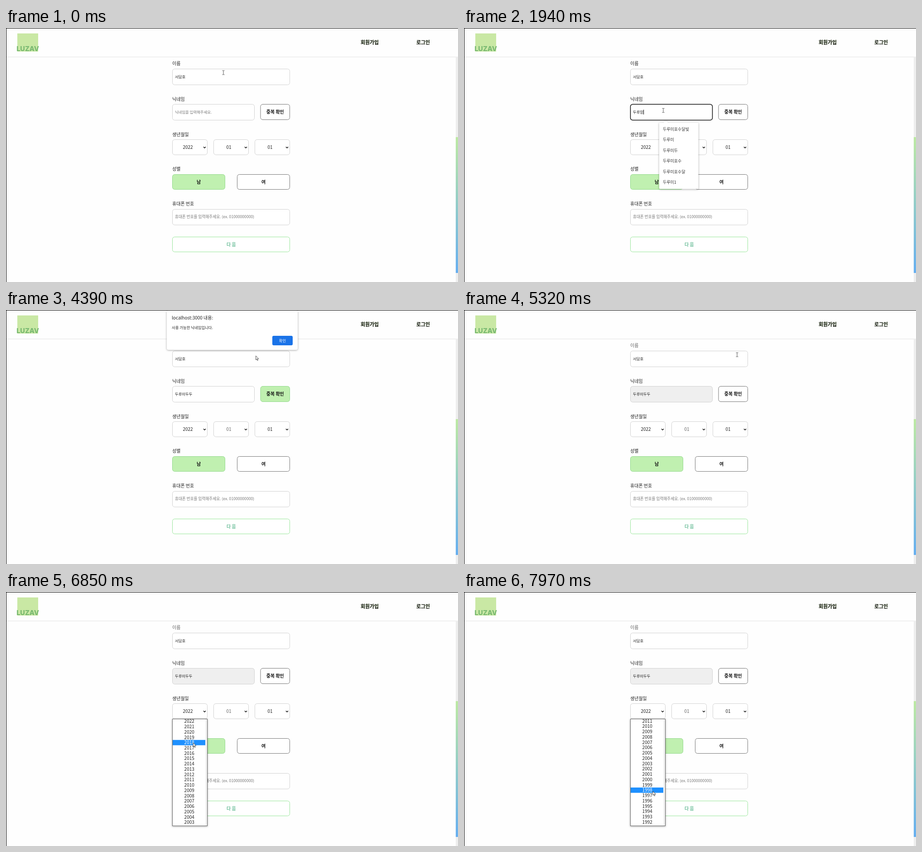
An HTML page for the animation above (8 s loop, 998x561 px).

```html
<!DOCTYPE html>
<html>
<head>
<meta charset="utf-8">
<title>Sign-up form</title>
<style>
  html, body { margin: 0; width: 100%; height: 100%; overflow: hidden; background: #fefefe; }
  svg { display: block; width: 998px; height: 561px; }
  text { font: 10px "Noto Sans CJK KR", "Noto Sans CJK", sans-serif; fill: #222; white-space: pre; }
  .bold { font-weight: 700; fill: #111; }
  .mid { text-anchor: middle; }
  .nav { font-size: 10.9px; filter: drop-shadow(.9px .8px 0 #a9dd74); }
  .small { font-size: 8.4px; }
  .hint { fill: #777; }
  .brand { font: 800 14.5px Inter, sans-serif; fill: #79b971; }
  .box { fill: #fff; stroke: #d2d2d2; }
  .dark { stroke: #777; }
  .pick { fill: #c0f0b0; stroke: #93d98d; }
  .next { stroke: #98e69a; }
  .chevron { fill: none; stroke: #111; stroke-width: 1.5; }
  .panel { fill: #fff; filter: drop-shadow(0 1px 2px #0005); }
  .popup text { font-size: 9px; fill: #333; }

  .step { animation: 8s step-end infinite; }
  #field { animation-name: field; }
  #check { animation-name: check; }
  #nameLabel { animation-name: name-tone; }
  #month { animation-name: month-tone; }
  .popup { animation-name: popup; }
  .dialog { animation-name: dialog; }
  .list { animation-name: list; }
  #caret { animation-name: caret; }
  .beam { animation-name: beam; }
  .arrow { animation-name: arrow; }
  .ping { animation-name: ping; }
  .cursor { animation: move 8s linear infinite; }

  @keyframes field {
    0%, 42.6% { fill: #fff; stroke: #d2d2d2; stroke-width: 1; }
    8.62% { stroke: #111; stroke-width: 1.5; }
    64.1%, 100% { fill: #efefef; stroke: #d2d2d2; stroke-width: 1; }
  }
  @keyframes check {
    0%, 64.1%, 73.7%, 100% { fill: #fff; stroke: #777; }
    41.8%, 71.75% { fill: #c0f0b0; stroke: #93d98d; }
  }
  @keyframes name-tone { 0% { fill: #222; } 64.1%, 100% { fill: #666; } }
  @keyframes month-tone { 0% { fill: #222; } 27.5%, 100% { fill: #666; } }
  @keyframes popup { 0%, 27.5%, 100% { visibility: hidden; } 8.62% { visibility: visible; } }
  @keyframes dialog { 0%, 64.1%, 100% { visibility: hidden; } 45% { visibility: visible; } }
  @keyframes list { 0% { visibility: hidden; } 81.25%, 100% { visibility: visible; } }
  @keyframes caret {
    0%, 32.9%, 42.6%, 100% { visibility: hidden; }
    8.62%, 39.1% { visibility: visible; }
  }
  @keyframes beam { 0%, 66% { visibility: visible; } 35.5%, 68.7%, 100% { visibility: hidden; } }
  @keyframes arrow { 0%, 66% { visibility: hidden; } 35.5%, 68.7%, 100% { visibility: visible; } }
  @keyframes ping {
    0%, 9.25%, 44.3%, 64.4%, 81.5%, 100% { visibility: hidden; }
    8.62%, 42.6%, 63.5%, 80.6% { visibility: visible; }
  }
  @keyframes move {
    0%, .5% { transform: translate(480px, 98.5px); animation-timing-function: ease-in-out; }
    5%, 32.1% { transform: translate(440px, 182px); animation-timing-function: ease-in-out; }
    37.5%, 39.5% { transform: translate(554px, 209px); animation-timing-function: ease-out; }
    42.5%, 45.5% { transform: translate(572px, 186px); }
    50% { transform: translate(576px, 152px); }
    55% { transform: translate(551px, 100px); }
    60.75% { transform: translate(580px, 48px); }
    63.5%, 64.3% { transform: translate(606px, 68px); }
    66.5% { transform: translate(603px, 98.5px); }
    71.4% { transform: translate(600px, 162px); }
    77.25% { transform: translate(513.5px, 264px); animation-timing-function: ease-out; }
    80.25%, 82.25% { transform: translate(418px, 268px); }
    90.5%, 96.3% { transform: translate(406.5px, 426px); animation-timing-function: ease-out; }
    99.6%, 100% { transform: translate(417px, 440px); }
  }
</style>
</head>
<body>
<svg viewBox="0 0 998 561">
  <defs>
    <linearGradient id="thumb" x2="0" y2="1">
      <stop stop-color="#bde9a3"/><stop offset="1" stop-color="#67aff0"/>
    </linearGradient>
    <clipPath id="listClip"><path d="M368 280.5h76v235.5h-76z"/></clipPath>
  </defs>

  <path d="M0 64h998" stroke="#e2e2e2"/>
  <path d="M993 65h5v496h-5z" fill="#eee"/>
  <path d="M993 241h5v300h-5z" fill="url(#thumb)"/>
  <path d="M0 .5h998M.5 0v561" stroke="#000"/>
  <rect x="25" y="12" width="46" height="40" fill="#c9e8a4"/>
  <text class="brand mid" x="48" y="51">LUZAV</text>
  <text class="bold nav mid" x="803" y="36.3">회원가입</text>
  <text class="bold nav mid" x="921" y="36.3">로그인</text>

  <text id="nameLabel" class="step" x="367" y="82.3">이름</text>
  <rect class="box" x="367.5" y="90.5" width="259" height="35" rx="5"/>
  <text class="small" x="373" y="110.5">서담호</text>

  <text x="367" y="160.6">닉네임</text>
  <rect id="field" class="box step" x="367.5" y="168.5" width="181" height="35" rx="5"/>
  <text id="typed" class="small" x="373" y="188.8"></text>
  <rect id="caret" class="step" x="373" y="180.5" width="1" height="10.5"/>
  <rect id="check" class="box dark step" x="562" y="168.5" width="64.5" height="34" rx="5"/>
  <text class="bold mid" x="594.3" y="189">중복 확인</text>

  <text x="367" y="238.6">생년월일</text>
  <rect class="box" x="367.5" y="246.5" width="77" height="33.5" rx="5"/>
  <rect class="box" x="458.5" y="246.5" width="77" height="33.5" rx="5"/>
  <rect class="box" x="549.5" y="246.5" width="77" height="33.5" rx="5"/>
  <text class="mid" x="401.5" y="267.2">2022</text>
  <text id="month" class="mid step" x="492" y="267.2">01</text>
  <text class="mid" x="583" y="267.2">01</text>
  <path class="chevron" d="M436 262.5l2.5 2.5 2.5-2.5m86 0l2.5 2.5 2.5-2.5m86 0l2.5 2.5 2.5-2.5"/>

  <text x="367" y="315.4">성별</text>
  <rect class="box pick" x="367.5" y="323.5" width="116" height="33" rx="5"/>
  <rect class="box dark" x="510.5" y="323.5" width="116" height="33" rx="5"/>
  <text class="bold mid" x="425.5" y="344">남</text>
  <text class="bold mid" x="568.5" y="344">여</text>

  <text x="367" y="392">휴대폰 번호</text>
  <rect class="box" x="367.5" y="400.5" width="259" height="34.5" rx="5"/>
  <text class="hint" style="font-size:8.65px" x="373" y="420.4">휴대폰 번호를 입력해주세요. (ex. 01000000000)</text>
  <rect class="box next" x="367.5" y="461.5" width="259" height="33" rx="5"/>
  <text class="bold mid" style="fill:#6fbf9b" x="497.3" y="481.8">다 음</text>

  <g class="popup step">
    <path class="panel" d="M433 209h7l5.5-4 5.5 4h64.5q2 0 2 2v142.500q0 2-2 2H433q-2 0-2-2V211q0-2 2-2z"/>
    <text x="439" y="226.9">두루미호수달빛</text>
    <text x="439" y="250.300">두루미</text>
    <text x="439" y="273.7">두루미두</text>
    <text x="439" y="297.1">두루미호수</text>
    <text x="439" y="320.500">두루미호수달</text>
    <text x="439" y="343.9">두루미1</text>
  </g>

  <g class="dialog step">
    <rect class="panel" x="355" y="1" width="289" height="87" rx="4"/>
    <text x="366" y="21">localhost:3000 내용:</text>
    <text class="small" x="366" y="42">사용 가능한 닉네임입니다.</text>
    <rect x="588" y="57" width="45" height="21" rx="3" fill="#1a73e8"/>
    <text class="small mid" style="fill:#fff" x="610.5" y="70.700">확인</text>
  </g>

  <g class="list step">
    <rect class="panel" x="367.5" y="280.5" width="77" height="236" stroke="#666"/>
    <path d="M440 281h4v235h-4z" fill="#f3f3f3"/>
    <g clip-path="url(#listClip)"><g id="rows">
      <rect id="mark" x="368" y="279.8" width="72" height="11.7" fill="#1e90ff"/>
    </g></g>
  </g>

  <g class="cursor">
    <circle class="ping step" cx="-1" cy="1" r="7.5" fill="#eaf200" opacity=".8"/>
    <path class="beam step" d="M-2.500-4.500h2l.5.500.500-.500h2M0-4v8M-2.500 4.500h2l.5-.500.500.500h2" fill="none" stroke="#444" stroke-width=".9"/>
    <path class="arrow step" d="M0 0V9l2-1.900 1.500 3.400 1.300-.600-1.500-3.300h3z" fill="#fff" stroke="#222" stroke-width=".8"/>
  </g>
</svg>
<script>
  const LOOP = 8000, PITCH = 11.74, TOP = 285.6;
  const $ = id => document.getElementById(id);
  const typed = $('typed'), caret = $('caret'), rows = $('rows'), mark = $('mark');
  const HINT = '닉네임을 입력해주세요.';

  // Each entry: start time in ms, then the values that hold from there on.
  const typing = [
    [0, ''], [1220, 'ㄷ'], [1320, '두'], [1430, '둘'], [1540, '두루'], [1650, '두룸'],
    [1760, '두루미'], [1910, '두루믿'], [2000, '두루미두'], [2070, '두루미둗'], [2130, '두루미두두']
  ];
  const scrolling = [[0, 0], [7380, 4], [7440, 6], [7510, 8], [7570, 10], [7640, 11.05]];
  const marking = [[0, 12], [7510, 16], [7640, 21], [7780, 23], [7900, 24]];
  const at = (track, t) => track.findLast(([start]) => start <= t)[1];

  const years = Array.from({ length: 34 }, (_, i) => {
    const year = document.createElementNS('http://www.w3.org/2000/svg', 'text');
    year.textContent = 2022 - i;
    year.setAttribute('class', 'mid');
    year.setAttribute('x', 404.7);
    year.setAttribute('y', TOP + 3.7 + i * PITCH);
    return rows.appendChild(year);
  });

  // While the pointer travels down the open list, the mark follows it.
  function markedRow(t) {
    if (t >= 7240) return at(marking, t);
    const y = 268 + 158 * (t - 6580) / 660;
    return Math.max(0, Math.floor((y - TOP) / PITCH + .5));
  }

  let start, shown, lit;
  function draw(now) {
    start ??= now;
    const t = (now - start) % LOOP;

    const value = at(typing, t);
    if (value !== shown) {
      shown = value;
      typed.textContent = value || HINT;
      typed.classList.toggle('hint', !value);
      caret.setAttribute('x', 373 + (value ? typed.getComputedTextLength() : 0));
    }

    const row = markedRow(t);
    if (row !== lit) {
      if (lit !== undefined) years[lit].style.fill = '';
      years[row].style.fill = '#fff';
      mark.setAttribute('transform', `translate(0 ${row * PITCH})`);
      lit = row;
    }
    rows.setAttribute('transform', `translate(0 ${-at(scrolling, t) * PITCH})`);
    requestAnimationFrame(draw);
  }
  requestAnimationFrame(draw);
</script>
</body>
</html>
```
